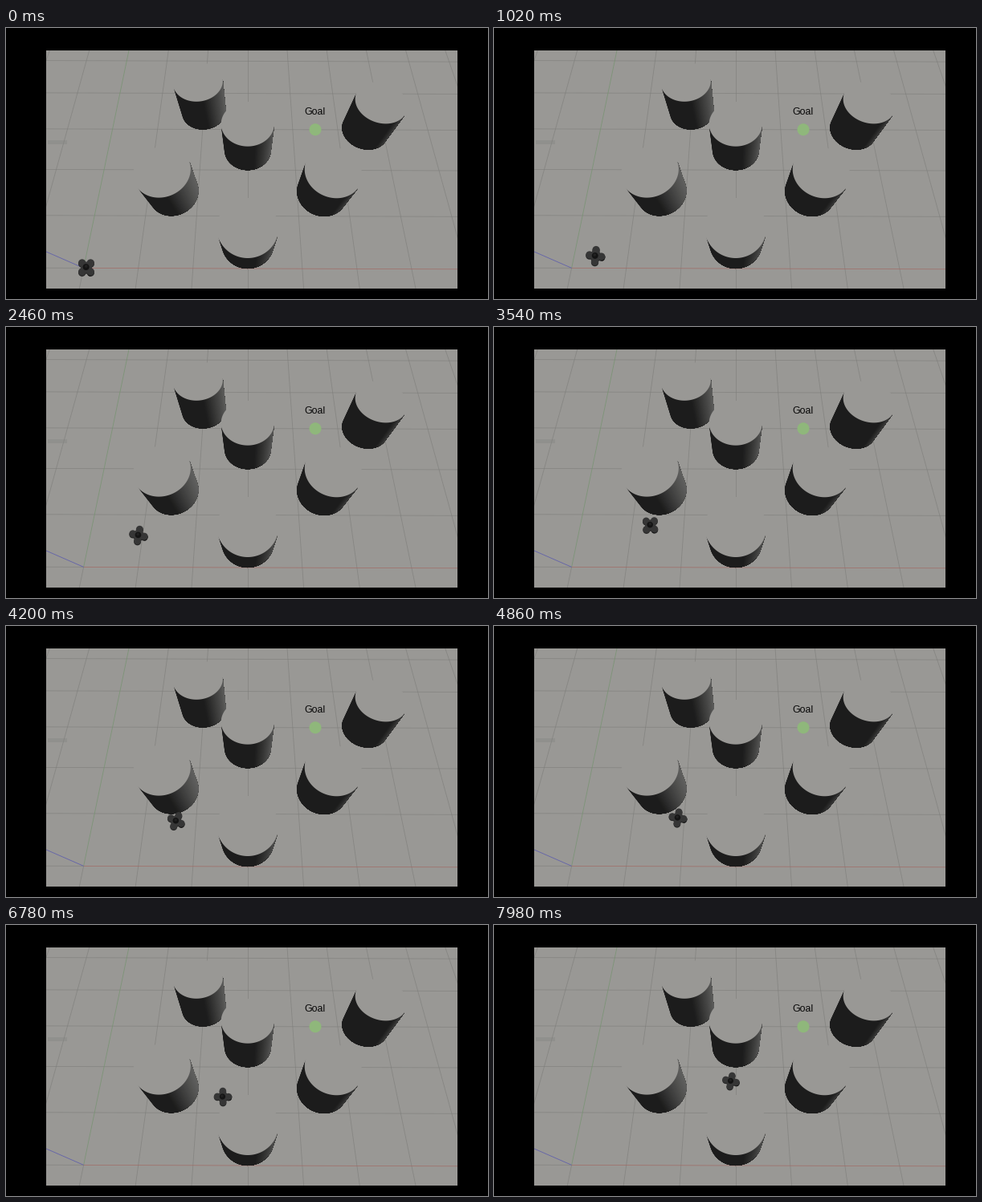
A matplotlib script for the animation above (8 s loop, 600 by 338 pixels).

```python
import numpy as np
import matplotlib.pyplot as plt
from matplotlib.animation import FuncAnimation
from matplotlib.collections import LineCollection, PolyCollection
from matplotlib.patches import Circle, Polygon, Rectangle

W, H, DPI = 600, 338, 64
PT = 72 / DPI  # points per pixel
FLOOR = "#999895"
X0, Y0, X1, Y1 = 50, 28, 562, 325

# Pinhole camera above the floor; one unit is one floor tile.
FOCAL, PITCH, CAM_H = 412.5, np.radians(64.4), 6.249
CAM_U, CAM_V = 3, -0.985
CX, CY, ROLL = 300.8, 176.7, 0.003

fig = plt.figure(figsize=(W / DPI, H / DPI), dpi=DPI, facecolor="black")
ax = fig.add_axes([0, 0, 1, 1])
ax.set_xlim(0, W)
ax.set_ylim(H, 0)
ax.axis("off")

panel = Rectangle((X0, Y0), X1 - X0, Y1 - Y0, fc=FLOOR, lw=0, zorder=0)
ax.add_patch(panel)


def project(u, v, h=0.0):
    """Stage position of a point u tiles right, v tiles ahead and h tiles up."""
    d, drop = np.asarray(v) - CAM_V, CAM_H - h
    depth = d * np.cos(PITCH) + drop * np.sin(PITCH)
    x = CX + FOCAL * (np.asarray(u) - CAM_U) / depth
    y = CY + FOCAL * (drop * np.cos(PITCH) - d * np.sin(PITCH)) / depth
    return np.stack(np.broadcast_arrays(x, y + ROLL * (x - CX)), axis=-1)


def lines(segs, color, alpha):
    lc = LineCollection(segs, colors=color, linewidths=0.85 * PT, alpha=alpha, zorder=1)
    ax.add_collection(lc)
    lc.set_clip_path(panel)


NEAR, FAR = -0.6, 5.5
origin = project(0, 0)
grid = [project([i, i], [NEAR, FAR]) for i in range(-2, 9) if i]
grid += [project([-3, 9], [k, k]) for k in range(1, 6)]
grid += [project([0, 0], [NEAR, 0]), project([-3, 0], [0, 0])]
lines(grid, "#7b7b78", 0.62)
lines([project([0, 0], [0, FAR])], "#74936e", 0.75)
lines([project([0, 9], [0, 0])], "#a26660", 0.75)
lines([[origin, (X0, 279)]], "#5a5aad", 0.85)
ax.add_patch(Rectangle((52, 139.5), 24, 5.5, fc="#82827f", lw=0, alpha=0.35, zorder=1))


def cylinder(u, v, z, r=0.5, height=1.0):
    """Visible wall in shaded strips, with a top that looks like the floor."""
    def rim(a, h):
        return project(u + r * np.cos(a), v + r * np.sin(a), h)

    du, dv = CAM_U - u, CAM_V - v
    mid, half = np.arctan2(dv, du), np.arccos(r / np.hypot(du, dv))
    a = np.linspace(mid - half, mid + half, 61)
    # Each strip runs on to the far edge, so later strips cover it without seams.
    top, base = rim(a, height), rim(a, 0)
    strips = [np.vstack([top[i:], base[i:][::-1]]) for i in range(len(a) - 1)]
    light = np.clip(np.cos((a[:-1] + a[1:]) / 2 - np.radians(15)), 0, 1)
    shade = (28 + 68 * light) / 255
    colors = np.column_stack([shade, shade, shade * 0.985])
    ax.add_collection(PolyCollection(strips, facecolors=colors, linewidths=0, zorder=z))
    cap = rim(np.linspace(0, 2 * np.pi, 120), height)
    ax.add_patch(Polygon(cap, fc=FLOOR, lw=0, zorder=z + 0.05))


POSTS = [(2, 3.5), (5.6, 3), (3, 2.5), (1.5, 1.5), (4.5, 1.5), (3, 0.5)]
for n, (u, v) in enumerate(POSTS):
    cylinder(u, v, z=2 + n / 10)

ax.add_patch(Circle((385, 126.7), 7.5, fc="#8fb77b", lw=0, zorder=8))
ax.text(385, 108, "Goal", family="Liberation Sans", fontsize=12.4 * PT,
        color="#080808", ha="center", va="baseline", zorder=8)


def deck(radius, grey, drop=0.0):
    """Four rounded corners and a middle, as (x, y, radius, grey, drop)."""
    corners = [(5.3 * sx, 5.5 * sy, radius, grey, drop) for sx in (-1, 1) for sy in (-1, 1)]
    return corners + [(0, 0, radius + 2.3, grey, drop)]


wheels = [(4.4, 8.4, 2.6, 0.06, 0), (6.8, 7.4, 2.4, 0.06, 0)]
lidar = [(-0.4, -0.4, 4.0, 0.08, 0), (-0.2, -1.4, 1.8, 0.13, 0)]
PARTS = np.array(deck(4.7, 0.14, 1.2) + wheels + deck(4.7, 0.21) + lidar)
PX, PY, RADIUS, GREY, DROP = PARTS.T
robot = ax.scatter(PX, PY, c=[(g, g, g) for g in GREY], linewidths=0, zorder=9)

# Waypoints: time, x, y, heading in degrees.
PATH = np.array([(0, 100, 298.5, 0), (1020, 126.3, 284, 38), (2460, 165, 259.5, 33),
                 (3540, 194.6, 247, 2), (4860, 229, 239, 35), (6780, 270, 214, 45),
                 (7980, 295, 194.5, 32)])


def update(i):
    t = i // 3 * 60
    x, y, deg = (np.interp(t, PATH[:, 0], col) for col in PATH.T[1:])
    size = 0.89 + 0.11 * (y - 194.5) / 104
    c, s = np.cos(np.radians(deg)), np.sin(np.radians(deg))
    robot.set_offsets(np.column_stack([x + size * (PX * c + PY * s),
                                       y + size * (PY * c - PX * s + DROP)]))
    robot.set_sizes((2 * RADIUS * size * PT) ** 2)
    return (robot,)


anim = FuncAnimation(fig, update, frames=400, interval=20, repeat=True,
                     repeat_delay=0, cache_frame_data=False)
plt.show()
```
